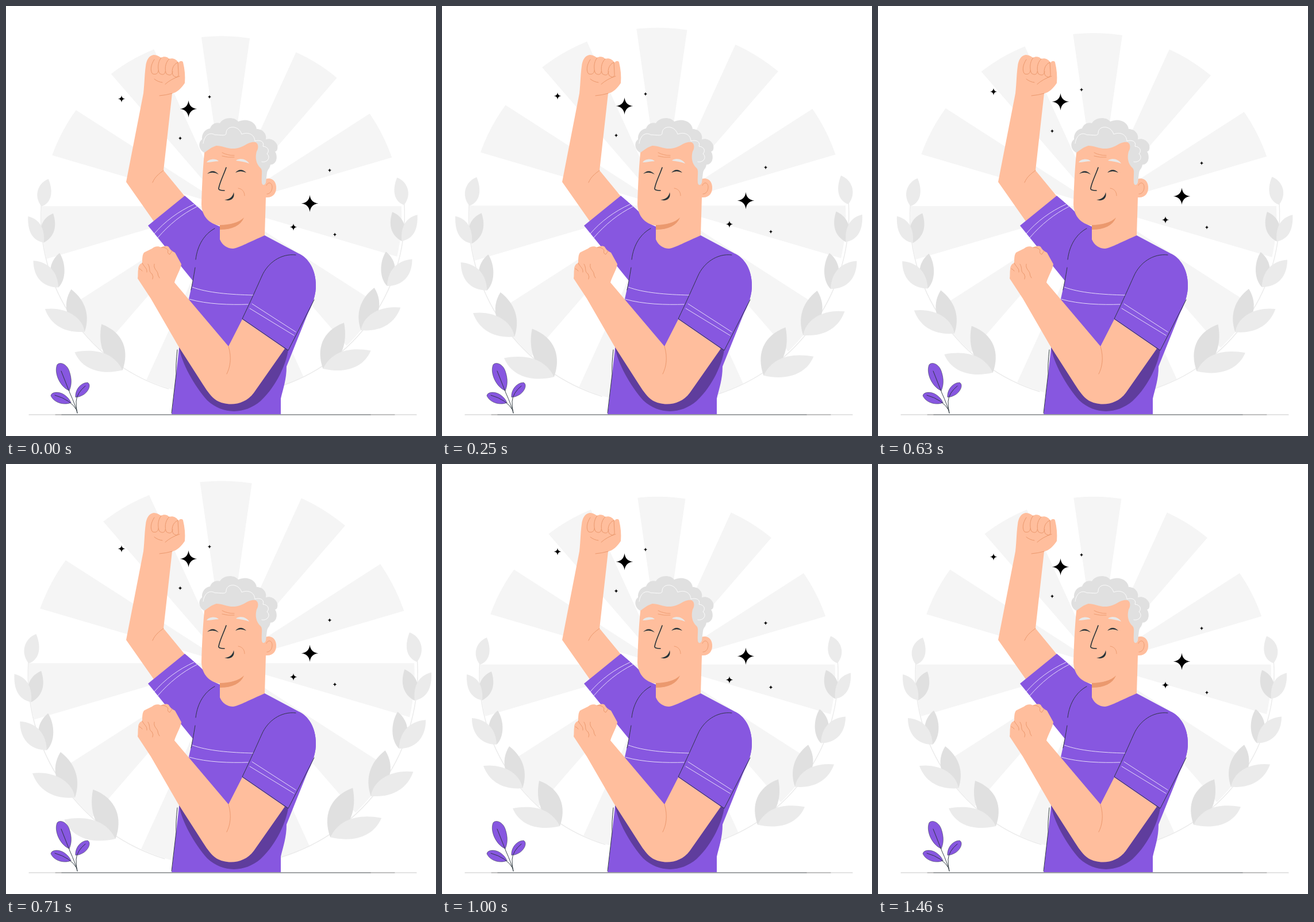
An HTML page with a canvas that plays this animation: 748x748 px, repeating every 1500 ms.

```html
<!DOCTYPE html>
<html lang="en">
<head>
<meta charset="utf-8">
<title>Cheering man</title>
<style>
  html, body { margin: 0; width: 100%; height: 100%; overflow: hidden; background: #fff; }
  canvas { display: block; width: 748px; height: 748px; }
</style>
</head>
<body>
<canvas id="stage" width="748" height="748"></canvas>
<script>
const SIZE = 748, LOOP = 1500, STEP = 1000 / 24;
const SKIN = '#ffbe9d', SKIN_LINE = '#eb996e', PURPLE = '#8757e0', SHADE = '#5f3d9d';
const INK = '#263238', HAIR = '#e0e0e0', PALE = '#ebebeb', RAY = '#f5f5f5';
const ctx = document.getElementById('stage').getContext('2d');

function fill(color, d) {
  ctx.fillStyle = color;
  ctx.fill(new Path2D(d));
}

function line(color, width, d) {
  ctx.strokeStyle = color;
  ctx.lineWidth = width;
  ctx.stroke(new Path2D(d));
}

// Linear interpolation through [time fraction, value] stops
function track(stops, p) {
  const i = stops.findIndex(s => s[0] > p);
  const [a, from] = stops[i - 1], [b, to] = stops[i];
  return from + (to - from) * (p - a) / (b - a);
}
const BEAT = [[0, 1], [.1, 1.1], [.3, 1], [.4, 1], [.5, 1.1], [.6, 1], [1, 1]];
const FLOAT = [[0, 0], [.5, -14.96], [1, 0]];

function rays() {
  ctx.save();
  ctx.beginPath();
  ctx.arc(375, 365.7, 309, 0, 7);
  ctx.clip();
  ctx.fillStyle = RAY;
  const sector = Math.PI / 11;
  for (let i = 0; i < 11; i++) {
    const a = 2 * i * sector;
    ctx.beginPath();
    ctx.moveTo(382, 348.7);
    ctx.arc(382, 348.7, 420, a, a + sector);
    ctx.fill();
  }
  ctx.restore();
}

function laurel() {
  ctx.strokeStyle = PALE;
  ctx.lineWidth = 1.4;
  ctx.beginPath();
  ctx.arc(375, 365.7, 310, 1.87, 3.2);
  ctx.stroke();
  fill(PALE, 'M78 302C61 308 51 330 66 349C81 344 88 327 78 302Z');
  fill(HAIR, 'M86 361C64 370 59 394 70 411C89 401 93 382 86 361Z');
  fill(PALE, 'M43 366C42 390 49 407 70 411C72 388 64 371 43 366Z');
  fill(HAIR, 'M97 429C77 445 76 472 95 488C109 474 108 446 97 429Z');
  fill(PALE, 'M52 442C52 470 68 488 95 488C94 462 79 444 52 442Z');
  fill(HAIR, 'M117 491C100 518 109 550 140 564C149 538 143 511 117 491Z');
  fill(PALE, 'M72 525C82 553 107 567 140 564C136 538 107 521 72 525Z');
  fill(HAIR, 'M169 551C162 586 173 618 205 630C217 597 207 565 169 551Z');
  fill(PALE, 'M123 599C135 628 167 639 205 630C191 601 161 592 123 599Z');
}

function background(scale) {
  ctx.save();
  ctx.translate(SIZE / 2, SIZE / 2);
  ctx.scale(scale, scale);
  ctx.translate(-SIZE / 2, -SIZE / 2);
  rays();
  laurel();
  ctx.translate(754, -2.5);
  ctx.scale(-1, 1);
  laurel();
  ctx.restore();
}

function star(x, y, r) {
  const c = r * .1;
  ctx.beginPath();
  ctx.moveTo(x, y - r);
  ctx.quadraticCurveTo(x + c, y - c, x + r, y);
  ctx.quadraticCurveTo(x + c, y + c, x, y + r);
  ctx.quadraticCurveTo(x - c, y + c, x - r, y);
  ctx.quadraticCurveTo(x - c, y - c, x, y - r);
  ctx.fill();
}

function sparkles(dy) {
  ctx.fillStyle = '#000';
  const spots = [
    [201, 162, 6.2], [317.5, 179.5, 14.8], [354, 158.4, 3.6], [303, 230.5, 3.6],
    [563, 286.2, 3.6], [528.5, 343.9, 14.8], [500, 385, 6.2], [572, 398, 3.6]
  ];
  for (const [x, y, r] of spots) star(x, y + dy, r);
}

function ground() {
  line('#c8c8c8', 1.2, 'M40 711H714');
  line('#5c6367', 1.2, 'M97 711H634');
  line('#999', 1, 'M86 711H97M634 711H676');
}

function plant() {
  const leaves = `M110 669C94 663 83 638 89 624C94 618 106 623 110 635C115 649 114 661 110 669Z
    M113 690C102 695 84 691 78 678C79 671 92 670 101 676C108 681 111 685 113 690Z
    M121 680C120 668 130 655 142 655C149 659 143 671 135 676C128 680 124 681 121 680Z`;
  fill(PURPLE, leaves);
  line(INK, .5, leaves);
  line(INK, .9, 'M96 635L111 673Q121 695 124 708M85 677Q113 685 123 703M138 661Q123 673 122 688Q122 700 124 708');
}

function raisedArm() {
  fill(SKIN, `M209 306L239 152C241 135 241 118 243 105C244 94 249 86 257 85C262 85 267 88 270 90
    C274 87 281 88 284 92C289 90 297 92 300 99C302 95 307 95 308 98C311 110 312 122 311 134
    C306 142 297 151 289 152L274 286L311 331L330 357L275 400Z`);
  line(SKIN_LINE, 1, `M258 93C251 103 251 114 255 118C261 120 265 117 265 112
    M270 90C263 98 264 111 267 117C272 121 277 119 277 114M284 92C276 99 276 112 279 118C285 122 289 120 290 114
    M299 98C289 102 287 115 291 121C297 126 301 123 300 117L299 98M258 127Q264 132 272 133
    M277 136Q287 127 302 122M267 156Q279 155 289 152M255 307C259 297 266 292 274 286`);
}

function torso() {
  fill(PURPLE, `M247 382L311 330C325 342 343 357 346 362C353 375 363 380 373 384L450 399L510 431
    C530 441 540 464 539 490C538 510 529 527 525 535L488 627C488 650 482 665 478 683V710H288
    L301 596L317 514L325 478Z`);
  line('#e7ddf9', 1, `M258 396C276 375 300 357 327 345M264 403C284 380 306 362 332 349
    M324 489C350 499 390 502 430 503M319 510C350 519 390 520 421 519`);
  line(INK, .9, 'M330 441C333 415 346 396 363 387M329 455Q325 480 322 494M298 598Q295 625 296 640L288 708');
  fill(SHADE, `M301 594C306 622 327 660 350 686C377 711 415 711 443 687
    C472 660 488 620 491 598L484 594L400 650Z`);
}

function head() {
  fill(SKIN, `M346 246C343 275 341 305 340 345C341 366 353 379 372 382V406C376 416 385 422 395 422
    C403 421 410 417 450 399L452 333C465 334 471 325 470 314C469 301 458 297 449 302
    L455 250L420 225L360 230Z`);
  fill(SKIN_LINE, 'M372 381C390 381 406 376 414 368C408 382 394 389 372 389Z');
  fill(HAIR, `M345 255C336 251 333 238 341 232C340 223 346 214 355 213C358 204 367 202 372 204
    C378 193 397 192 404 201C419 194 435 202 436 214C447 214 454 223 452 232C464 228 475 240 472 249
    C472 251 470 253 468 253C474 263 470 276 460 276C459 283 455 284 454 290L452 307
    C450 313 446 312 445 308C444 295 447 286 443 282C435 275 433 264 436 253C440 247 439 239 434 237
    C420 235 416 246 398 248C386 249 376 243 366 243C358 245 351 251 345 255Z`);
  line('#fff', .9, `M343 239C345 224 355 219 363 224C374 224 383 227 383 221C383 208 404 206 410 223
    C420 219 432 222 433 235C442 232 450 236 447 244C456 245 459 252 454 257C461 263 455 273 445 271`);
  fill('#e8e8e8', 'M349 272C352 266 365 264 370 270C363 270 356 272 349 272ZM400 269C407 263 419 267 423 274C415 271 407 270 400 269Z');
  fill(INK, 'M350 292Q360 282 370 293Q360 287 350 292ZM399 290Q408 280 418 290Q408 285 399 290Z');
  line(INK, 1.6, 'M383 281C379 293 372 306 370 317Q369 321 380 321');
  fill(INK, 'M380 337C389 337 395 331 396 324C399 334 391 341 380 337Z');
  line(SKIN_LINE, .9, `M376 255Q385 260 397 260M376 261Q386 264 397 263M404 317C411 318 415 323 415 330
    M453 312C456 305 463 307 463 315C463 322 459 327 454 327`);
}

function frontArm() {
  fill(SKIN, `M229 474C230 468 229 463 230 458C230 451 234 448 237 447C237 440 237 433 240 429
    C245 426 250 424 254 422C258 418 265 417 270 420C275 417 280 417 283 419C285 422 287 426 294 429
    L305 449C304 458 296 470 293 481L387 592L411 545L485 596L431 673
    C415 695 385 697 366 686C358 681 350 670 343 659L300 592L252 509Z`);
  line(SKIN_LINE, 1, `M237 447C240 454 246 456 245 463M232 457Q235 458 237 461M247 449C252 456 247 462 254 466Q257 471 255 475
    M258 449C256 457 263 460 264 465Q264 469 267 473M270 420Q278 419 282 425Q280 431 285 432L289 426
    M387 592C393 612 390 628 384 640`);
}

function frontSleeve() {
  fill(PURPLE, `M411 544C425 515 436 490 445 470C455 445 480 430 505 433L510 431
    C530 441 540 464 539 490C538 510 529 525 525 535L491 599Z`);
  line('#e7ddf9', 1, 'M428 518L504 567M424 526L501 573');
  line(INK, .9, 'M504 433C478 430 455 447 445 470C436 490 425 515 411 544L491 599L536 511');
}

function draw() {
  const now = performance.now() % LOOP;
  const frame = Math.floor((now + 4) / STEP) % 36;
  const p = (frame + .5) / 36;
  ctx.fillStyle = '#fff';
  ctx.fillRect(0, 0, SIZE, SIZE);
  background(track(BEAT, p));
  ground();
  plant();
  raisedArm();
  torso();
  head();
  frontArm();
  frontSleeve();
  sparkles(track(FLOAT, p));
  requestAnimationFrame(draw);
}

ctx.lineCap = ctx.lineJoin = 'round';
draw();
</script>
</body>
</html>
```
